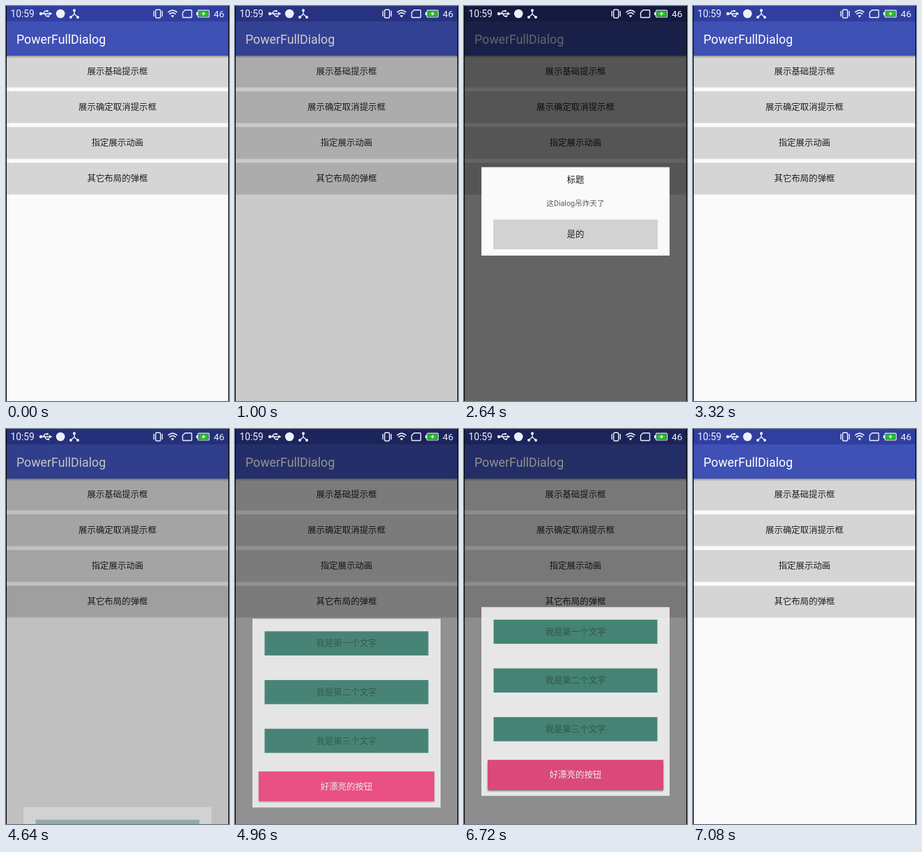
These frames come from a looping animation (320 px wide and 565 px high, 7480 ms). An HTML page:

```html
<!DOCTYPE html>
<html lang="zh-CN">
<head>
<meta charset="utf-8">
<title>PowerFullDialog</title>
<style>
  html, body { margin: 0; width: 100%; height: 100%; overflow: hidden; background: #000; }
  svg { display: block; width: 320px; height: 565px; }
  text { font: 12.44px Roboto, "Noto Sans CJK SC", "Noto Sans CJK", sans-serif; }
  .mid { text-anchor: middle; }
  .line { fill: none; stroke: #eef0fa; stroke-width: 1.4; stroke-linecap: round; stroke-linejoin: round; }
  .solid { fill: #eef0fa; }
</style>
</head>
<body>
<svg viewBox="0 0 320 565">
  <defs>
    <linearGradient id="fall" x1="0" y1="0" x2="0" y2="1">
      <stop offset="0" stop-color="#000" stop-opacity=".32"/>
      <stop offset="1" stop-color="#000" stop-opacity="0"/>
    </linearGradient>
    <filter id="soft" x="-10%" y="-30%" width="120%" height="160%">
      <feGaussianBlur stdDeviation="1.2"/>
    </filter>
    <clipPath id="screen"><rect x="1" width="318" height="565"/></clipPath>
  </defs>

  <g clip-path="url(#screen)">
    <rect width="320" height="565" fill="#fafafa"/>
    <g id="list"></g>
    <rect y="71" width="320" height="3.5" fill="url(#fall)"/>
    <rect y="22" width="320" height="49" fill="#3f51b5"/>
    <rect width="320" height="22" fill="#303f9f"/>
    <text x="15" y="54" fill="#fff" style="font-size:17.78px">PowerFullDialog</text>
    <rect id="dim" width="320" height="565" opacity="0"/>

    <g id="notice" visibility="hidden">
      <rect x="25" y="230.5" width="270" height="126.5" fill="#fafafa"/>
    </g>
    <g id="custom" visibility="hidden">
      <rect x="25" y="158.5" width="270" height="270" fill="#fafafa"/>
      <rect id="glow" x="34" y="378" width="252" height="42.5" opacity=".35" filter="url(#soft)"/>
    </g>

    <g id="status">
      <text class="solid" x="6.5" y="16.2" style="font-size:13.8px">10:59</text>
      <g class="line">
        <path d="M50 11H63M53 11L56 7.2H59M55.500 11L58 14.600H60.500"/>
        <path d="M98 7V11.500L93.500 15.500M98 11.500L102.500 15.500"/>
        <rect x="214.700" y="5.200" width="7" height="11.800" rx="1.500"/>
        <path d="M212.200 7.500V14.500M224.200 7.500V14.500"/>
        <path d="M233 8.600Q239 3.600 245 8.600M235 11.400Q239 8 243 11.400" stroke-width="1.700"/>
        <path d="M257 5.800H265.500Q266.500 5.800 266.500 6.800V15.500Q266.500 16.500 265.500 16.500H254.500Q253.500 16.500 253.500 15.500V9.300Z"/>
        <rect x="275.500" y="6.200" width="16" height="9.800" rx="1" stroke-width="1.200"/>
      </g>
      <g class="solid">
        <circle cx="50" cy="11" r="2.200"/>
        <path d="M62 8.500L66.500 11L62 13.500Z"/>
        <circle cx="59.500" cy="7.200" r="1.400"/>
        <rect x="59.500" y="13.300" width="2.600" height="2.600"/>
        <circle cx="78.200" cy="11" r="6.300"/>
        <circle cx="98" cy="6.300" r="2"/>
        <circle cx="93" cy="16" r="2"/>
        <circle cx="103" cy="16" r="2"/>
        <path d="M236.700 13.800Q239 12.200 241.300 13.800L239 16.500Z"/>
        <rect x="273" y="9" width="2" height="4.200"/>
      </g>
      <rect x="276.700" y="7.400" width="13.600" height="7.400" fill="#22c322"/>
      <path d="M284.500 7.600L280.800 11.700H283.300L282.400 14.600L286.200 10.500H283.700Z" fill="#fff"/>
      <text class="solid" x="298" y="16.200" style="font-size:13.6px">46</text>
    </g>
  </g>
</svg>

<script>
const NS = 'http://www.w3.org/2000/svg';
const LOOP = 7480, STEP = 40, H = 565;
const IN = 1000, OUT = 480, DIM = 0.6;
const $ = id => document.getElementById(id);

function add(parent, tag, attrs, text) {
  const el = document.createElementNS(NS, tag);
  for (const k in attrs) el.setAttribute(k, attrs[k]);
  if (text) el.textContent = text;
  parent.appendChild(el);
  return el;
}

function label(parent, text, mid, fill, size = 12.44) {
  add(parent, 'text', {
    x: 160, y: mid + size * 0.375, class: 'mid', fill, style: `font-size:${size}px`
  }, text);
}

let clips = 0;
// A filled button with a clipped touch ripple; returns the ripple circle.
function button(parent, x, y, w, h, fill, text, ink) {
  const id = 'clip' + clips++;
  const box = { x, y, width: w, height: h };
  add(add(parent, 'clipPath', { id }), 'rect', box);
  add(parent, 'rect', { ...box, fill });
  const g = add(parent, 'g', { 'clip-path': `url(#${id})` });
  const ripple = add(g, 'circle', { cx: 160, cy: y + h / 2, r: 0, opacity: 0 });
  label(parent, text, y + h / 2, ink);
  return ripple;
}

const rows = ['展示基础提示框', '展示确定取消提示框', '指定展示动画', '其它布局的弹框'].map((s, i) => {
  const y = 71 + i * 51.1;
  add($('list'), 'rect', { x: 0, y: y + 0.6, width: 320, height: 45, opacity: 0.13 });
  return button($('list'), 0, y, 320, 44, '#d5d5d5', s, '#212121');
});

label($('notice'), '标题', 248, '#1c1c1c');
label($('notice'), '这Dialog吊炸天了', 281.5, '#5c5c5c', 10.67);
const okRipple = button($('notice'), 42, 305.5, 236, 42.5, '#d5d5d5', '是的', '#212121');

['我是第一个文字', '我是第二个文字', '我是第三个文字'].forEach((s, i) =>
  button($('custom'), 42.5, 176.5 + i * 69.7, 235, 34.5, '#378270', s, '#1d4d42'));
const pinkRipple = button($('custom'), 34, 377, 252, 42.5, '#ff4081', '好漂亮的按钮', '#fff');

const dialogs = [
  { el: $('notice'), open: 678, close: 2840 },
  { el: $('custom'), open: 4255, close: 6590 }
];
const presses = [
  { el: rows[0], at: 320 },
  { el: rows[3], at: 4080 }
];

const clamp = x => Math.max(0, Math.min(1, x));
const ease = x => (1 - Math.cos(Math.PI * x)) / 2;

function setRipple(el, r, opacity) {
  el.setAttribute('r', r);
  el.setAttribute('opacity', opacity);
}

function draw(t) {
  let dim = 0;
  for (const d of dialogs) {
    const a = clamp((t - d.open) / IN), b = clamp((t - d.close) / OUT);
    const shown = b > 0 ? 1 - ease(b) : ease(a);
    dim = Math.max(dim, b > 0 ? 1 - b : a);
    d.el.setAttribute('visibility', shown > 0 ? 'visible' : 'hidden');
    d.el.setAttribute('opacity', shown);
    d.el.setAttribute('transform', `translate(0 ${(1 - shown) * H})`);
  }
  $('dim').setAttribute('opacity', dim * DIM);

  for (const p of presses) {
    const age = t - p.at + STEP;
    const fade = 1 - clamp((age - 360) / 440);
    setRipple(p.el, 170 * clamp(age / 320), age > 0 ? 0.06 * fade : 0);
  }
  setRipple(okRipple, 130, t >= 2640 && t < 3400 ? 0.015 : 0);
  const push = clamp((t - 6360) / 80);
  setRipple(pinkRipple, 140, push * 0.08);
  $('glow').setAttribute('opacity', 0.35 + push * 0.2);
  $('glow').setAttribute('y', 378 + push);
}

const start = performance.now();
function tick() {
  const t = (performance.now() - start) % LOOP;
  draw(Math.floor(t / STEP) * STEP);
  requestAnimationFrame(tick);
}
draw(0);
requestAnimationFrame(tick);
</script>
</body>
</html>
```
